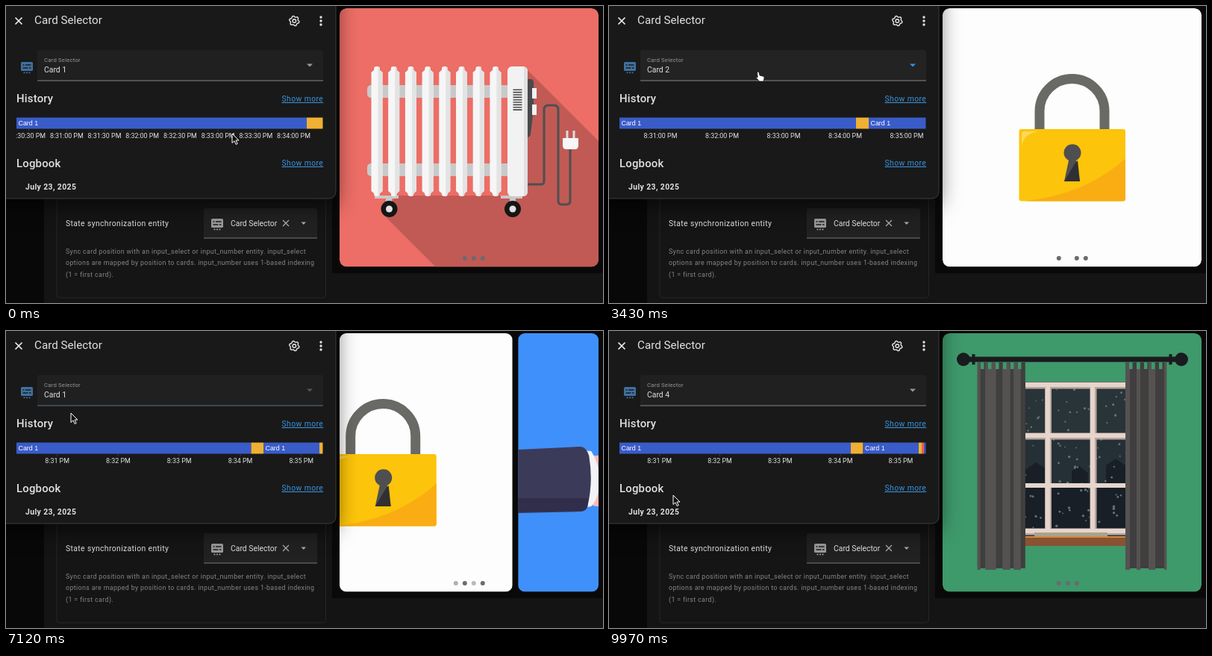
An HTML page for the animation above (10000 ms loop, 800 by 398 pixels).

```html
<!DOCTYPE html>
<html lang="en">
<head>
<meta charset="utf-8">
<style>
html, body { margin: 0; height: 100%; overflow: hidden; background: #080808; }
svg { display: block; width: 800px; height: 398px; font-family: Roboto, sans-serif; font-size: 10.4px; }
.heading { font-size: 14.9px; font-weight: 500; letter-spacing: .2px; }
.link { fill: #3a93dc; text-decoration: underline; letter-spacing: .4px; }
.small { font-size: 8.9px; }
.bar { font: 8.9px "Liberation Sans", Arial, sans-serif; fill: #fff; }
#dialog { filter: drop-shadow(0 10px 14px rgba(0,0,0,.6)); }
</style>
</head>
<body>
<svg viewBox="0 0 800 398" fill="#e1e1e1">
  <defs>
    <clipPath id="view"><rect x="447" y="3" width="347" height="346.500" rx="9"/></clipPath>
    <clipPath id="slide"><rect width="347" height="346.500" rx="9"/></clipPath>
    <clipPath id="axisClip"><rect x="14" y="145" width="411" height="40"/></clipPath>
    <clipPath id="menuClip"><rect x="42" y="106" width="83.500" height="129" rx="3"/></clipPath>
    <g id="selectIcon">
      <rect width="16" height="12" rx="1.500"/>
      <path d="M2.500 4h2m1.500 0h7.500M2.500 8h7m1.500 0h2.500" stroke="#1d1d1d" stroke-width="1.300"/>
      <path d="M3.500 14.300h2m1.500 0h2m1.500 0h2" stroke="currentColor" stroke-width="1.700"/>
    </g>
  </defs>

  <rect width="800" height="398" fill="#080808"/>
  <rect x="51" width="749" height="398" fill="#141414"/>
  <rect x="437" width="363" height="358" fill="#090909"/>
  <rect x="68" y="200" width="360.500" height="191" rx="4" fill="#151515" stroke="#262626"/>
  <text x="80" y="294.500" letter-spacing=".37">State synchronization entity</text>
  <path d="M265 311v-37q0-3 3-3h146q3 0 3 3v37z" fill="#212121"/>
  <path d="M265 311h152" stroke="#777"/>
  <use href="#selectIcon" x="275" y="285" fill="#9b9b9b" color="#9b9b9b"/>
  <text x="301" y="294.500">Card Selector</text>
  <path d="M371 287l8 8m0-8l-8 8" stroke="#aaa" stroke-width="1.300"/>
  <path d="M395.500 289.500h6.500l-3.250 3.500z" fill="#aaa"/>
  <g class="small" fill="#858585" letter-spacing=".35">
    <text x="80" y="331.500">Sync card position with an input_select or input_number entity. input_select</text>
    <text x="80" y="347">options are mapped by position to cards. input_number uses 1-based indexing</text>
    <text x="80" y="362.500">(1 = first card).</text>
  </g>

  <g clip-path="url(#view)">
    <g id="track">
      <g class="card">
        <rect x="447" y="3" width="347" height="347" fill="#ec6e66"/>
        <path d="M698 85l96 96v169H576l-72-72 20-24h150z" fill="#c15a55"/>
        <g fill="#c9c9c9"><rect x="484" y="106" width="200" height="17" rx="5"/><rect x="484" y="211" width="200" height="17" rx="5"/></g>
        <path d="M494 254h32v4h-9v9h-8v-9h-15zM663 254h29v4h-9v9h-8v-9h-12z" fill="#c9c9c9"/>
        <g fill="#161616"><circle cx="513.500" cy="272" r="11"/><circle cx="679" cy="272" r="11"/></g>
        <circle cx="513.500" cy="272" r="4.500"/><circle cx="679" cy="272" r="4.500"/>
        <g id="fins"></g>
        <path d="M698 98h5q4 0 4 5v35l-4 34q-1 4-5 4z" fill="#4a4a4c"/>
        <path d="M705 110h6v14h-6zM705 132h6v14h-6z" fill="#f2f2f2"/>
        <path d="M699 239h18q4 0 4-4V139q0-6 6-6h7q6 0 6 6v122q0 5 5 5h6q5 0 5-5v-70" fill="none" stroke="#4f4f51" stroke-width="3"/>
        <rect x="672" y="81" width="27" height="174" rx="6" fill="#f2f2f2"/>
        <path d="M694 81.500q5 1 5 6V249q0 5-5 6z" fill="#e0e0e0"/>
        <path d="M685.500 111.500v29" stroke="#4a4a4c" stroke-width="12" stroke-dasharray="1.600 1.750"/>
        <path d="M752 167v11m9-11v11" stroke="#ddd" stroke-width="3"/>
        <path d="M746 177h21v10q0 5-5 5h-11q-5 0-5-5z" fill="#f7f7f7"/>
      </g>
      <g class="card">
        <rect x="447" y="3" width="347" height="347" fill="#fdfdfd"/>
        <path d="M577 166v-25a43.500 43.500 0 0 1 87 0v25" fill="none" stroke="#696a65" stroke-width="13"/>
        <rect x="549.500" y="165" width="142.500" height="96.500" rx="3" fill="#fcc40a"/>
        <path d="M558 261.500q80-9 134-57v54q0 3-3 3z" fill="#f9ad13"/>
        <path d="M553 190q1-19 23-22h-19q-4 0-4 4z" fill="#fdd856"/>
        <path d="M616 207a11.500 11.500 0 1 1 10 0l5 28h-21z" fill="#4f4f51"/>
        <path d="M628 207l3 28h-21l15-25z" fill="#303033"/>
      </g>
      <g class="card">
        <rect x="447" y="3" width="347" height="347" fill="#4090fb"/>
        <path d="M606 190q-5 60 20 74 10 4 12-9l8-18q17-3 13-23l-9-35z" fill="#f99b98"/>
        <path d="M628 200q-10 22 2 46m18-56q-7 22 0 40" fill="none" stroke="#ef8582" stroke-width="1.500"/>
        <path d="M547 167q24 0 38-9 18-11 36-5 14 5 36 5l67-1q6 2 4 8-2 5-10 6l-63 14q-10 4-16 12-8 12-10 23 8 10 19 15 10 0 20 6 10 8 5 15-4 6-13 2-24-11-37-21-14-9-32-5-24 6-44 2z" fill="#fdbbb9"/>
        <path d="M657 247q10-6 17 2 2 7-5 10-10-2-12-12z" fill="#fed5d1"/>
        <path d="M534 160l11 1q11 17 11 40 0 22-11 34l-12 2z" fill="#f3f3f7"/>
        <path d="M447 159l82-4q9-1 13 12 6 35-2 68-2 7-9 7l-84 2z" fill="#3c3a59"/>
        <path d="M447 224l94.500 0-1.500 11q-2 6-9 6l-84 2z" fill="#302e4a"/>
        <rect x="772" y="141" width="10" height="39" rx="2" fill="#2e3153"/>
        <rect x="779" y="106" width="40" height="109" rx="6" fill="#fbfbfd"/>
      </g>
      <g class="card">
        <rect x="447" y="3" width="347" height="347" fill="#3e996b"/>
        <rect x="552" y="68" width="146" height="208" fill="#293439"/>
        <path d="M552 140h140v70H552z" fill="#253036"/>
        <path d="M558 264v-78l14-10 13 8v20h35v-16l10-7 12 9v16h24v-26l13-9 13 9v84z" fill="#181f27"/>
        <g id="snow" fill="#667178"></g>
        <path d="M558 73h134M588.500 70v196M649 70v196M558 141h134M558 269h134" stroke="#b9a69c" stroke-width="9"/>
        <path d="M558 72h134M588 70v196M648 70v196M558 140h134M558 207h134M558 268h134" stroke="#e5d5cc" stroke-width="6"/>
        <path d="M552 275h146v13H552z" fill="#8a5230"/>
        <path d="M570 270h98v6h-98z" fill="#aaa28c"/>
        <path d="M558 276h134" stroke="#c98e45" stroke-width="2"/>
        <g id="curtains"></g>
        <path d="M478 38h286" stroke="#1a1b1f" stroke-width="7"/>
        <path d="M488.500 31v14M752.500 31v14" stroke="#1a1b1f" stroke-width="4"/>
        <circle cx="475" cy="38" r="9" fill="#1a1b1f"/><circle cx="767" cy="38" r="9" fill="#1a1b1f"/>
      </g>
    </g>
    <g id="dots" fill="#6d6a6d"></g>
  </g>

  <path id="dialog" d="M-40-40H442V248q0 10-10 10H-40z" fill="#191919"/>
  <path d="M0 258h432q10 0 10-10V0" fill="none" stroke="#3d3d3d"/>
  <path d="M12.500 15.500l9 9m0-9l-9 9" stroke="#eee" stroke-width="1.700"/>
  <text x="38" y="24" font-size="15.200">Card Selector</text>
  <g fill="none" stroke="#e6e6e6" stroke-width="1.400" stroke-linejoin="round">
    <path id="gear"/><circle cx="386.300" cy="20" r="2.300"/>
  </g>
  <circle cx="422" cy="15" r="1.700"/><circle cx="422" cy="20" r="1.700"/><circle cx="422" cy="25" r="1.700"/>
  <use href="#selectIcon" x="20" y="75" fill="#41709f" color="#41709f"/>
  <path id="field" d="M42 100.500V62q0-3 3-3h377q3 0 3 3v38.500z"/>
  <path id="underline" d="M42 100h383"/>
  <text id="label" x="51" y="75.200" font-size="7.800" letter-spacing=".17">Card Selector</text>
  <text id="value" x="51" y="89"></text>
  <path id="caret"/>

  <text class="heading" x="14" y="129">History</text>
  <text class="link" x="369.500" y="128">Show more</text>
  <g id="history" clip-path="url(#axisClip)"></g>
  <text class="heading" x="14" y="215.500">Logbook</text>
  <text class="link" x="369.500" y="214">Show more</text>
  <text x="26" y="246" font-weight="600" letter-spacing=".4">July 23, 2025</text>

  <g id="menu">
    <rect x="42" y="106" width="83.500" height="129" rx="3" fill="#1c1c1c" style="filter:drop-shadow(0 3px 4px rgba(0,0,0,.5))"/>
    <g clip-path="url(#menuClip)">
      <rect id="chosen" x="42" width="83.500" height="35.700" fill="#203849"/>
      <g id="items"></g>
    </g>
  </g>
  <g id="cursor" stroke-linejoin="round">
    <path id="arrow" d="M0 0v12.500l3-2.700 2.200 4.700 2-1-2.200-4.500H9z" fill="#111" stroke="#fff"/>
    <path id="hand" d="M-1.500 1q1.500-1.800 2.500 0l1 4 5 1.300q1.300.5 1 2.200l-.8 4.500H1.500L-2.700 8.300q-.2-1.800 1.900-.8z" fill="#fff" stroke="#111" stroke-width=".8"/>
  </g>
</svg>
<script>
const $ = id => document.getElementById(id);
const set = (id, attrs) => { for (const k in attrs) $(id).setAttribute(k, attrs[k]); };
const range = (n, f) => Array.from({ length: n }, (_, i) => f(i)).join('');
const clamp = v => Math.max(0, Math.min(1, v));

const LOOP = 10000, PITCH = 354.5, SLIDE = 500, ITEM = 35.7;
// Each pick: menu opens, menu closes, slide starts, chosen card
const picks = [[1050, 1990, 2120, 1], [3450, 4250, 4380, 2], [5700, 6940, 7028, 0], [8300, 9330, 9420, 3]];
// Pointer path: time, x, y
const path = [[0, 303, 171], [300, 303, 171], [900, 200, 84], [1150, 200, 84], [1700, 98, 155], [2050, 88, 160],
  [3250, 200, 88], [3500, 200, 88], [4100, 86, 196], [4300, 86, 196], [4900, 237, 97], [5100, 237, 97],
  [5600, 200, 84], [5800, 200, 84], [6700, 80, 123], [6950, 80, 122], [7120, 87, 110], [7500, 87, 110],
  [8250, 171, 70], [8480, 171, 70], [9200, 85, 224], [9970, 86, 220], [LOOP, 86, 220]];
const history = [
  { at: 0, start: 30.5, first: 30.6, gap: 50.7, stride: .5, cuts: [403] },
  { at: 2400, start: 31, first: 69, gap: 82.5, stride: 1, cuts: [331, 348] },
  { at: 4600, start: 31, first: 68.7, gap: 82.1, stride: 1, cuts: [329.5, 346, 421] },
  { at: 7050, start: 31, first: 68.6, gap: 81.8, stride: 1, cuts: [328.5, 345, 420] },
  { at: 7500, start: 31, first: 68.3, gap: 81.1, stride: 1, cuts: [326, 342.5, 417, 421] },
  { at: 9600, start: 31, first: 67.7, gap: 80.8, stride: 1, cuts: [324, 340.5, 415, 419, 422.5] }];
const colors = ['#3a5cc9', '#f0b033', '#3a5cc9', '#f0b033', '#e2644f', '#3a5cc9'];

document.querySelectorAll('.card').forEach((card, i) => {
  card.setAttribute('transform', `translate(${i * PITCH})`);
  const inner = card.innerHTML;
  card.innerHTML = `<g clip-path="url(#slide)" transform="translate(447 3)"><g transform="translate(-447 -3)">${inner}</g></g>`;
});
$('fins').innerHTML = range(8, i => `<g transform="translate(${489.5 + i * 22.7} 81)">
  <path d="M4 1q3.500-2 7 0l.5 4 3.500 3v159l-3.500 3-.5 3q-3.500 2-7 0l-.5-3-3.500-3V8l3.500-3z" fill="#f6f6f6"/>
  <path d="M9 0l2 1 .5 4 3.500 3v159l-3.500 3-.5 3-2 1z" fill="#e3e3e3"/></g>`);

let seed = 7;
const random = () => (seed = seed * 16807 % 2147483647) / 2147483647;
$('snow').innerHTML = range(100, () =>
  `<circle cx="${558 + random() * 134}" cy="${78 + random() * 186}" r="${.8 + random() * .9}"/>`);

const curtain = (x, widths, end) => widths.map((w, i) => {
  const strip = `<path d="M${x} 42h${w + .3}v${i % 2 ? end - 2 : end}h-${w + .3}z" fill="${i % 2 ? '#403e3f' : '#555251'}"/>`;
  x += w;
  return strip;
}).join('');
const loops = (x, n) => `<path d="M${x} 46.500h${n * 10}" stroke="#3e996b" stroke-width="9" stroke-dasharray="4.500 5.500"/>`;
$('curtains').innerHTML = curtain(493.5, [4, 7, 14, 9, 10, 5, 9, 6], 278) + curtain(692, [6, 9, 5, 11, 9, 12, 3], 278) +
  loops(498, 6) + loops(697, 5);

$('gear').setAttribute('d', 'M' + Array.from({ length: 24 }, (_, i) => {
  const a = (i + .5) * Math.PI / 12, r = i % 4 < 2 ? 6.7 : 5.3;
  return (386.3 + r * Math.cos(a)).toFixed(2) + ' ' + (20 + r * Math.sin(a)).toFixed(2);
}).join('L') + 'z');
$('dots').innerHTML = range(4, i => `<circle cx="${602.8 + i * 12}" cy="338" r="3"/>`);
$('items').innerHTML = range(4, i => `<text x="57" y="${128 + i * ITEM}">Card ${i + 1}</text>`);

function drawHistory({ start, first, gap, stride, cuts }, long) {
  const edges = [14, ...cuts, 424.5];
  const bars = range(edges.length - 1, i => {
    const x = edges[i], w = edges[i + 1] - x;
    return `<rect x="${x}" y="149.500" width="${w}" height="15" fill="${colors[i]}"/>` +
      (w > 50 ? `<text class="bar" x="${x + 2.5}" y="160">Card 1</text>` : '');
  });
  const labels = range(stride < 1 ? 8 : 5, i => {
    const minute = start + i * stride, x = first + i * gap;
    const seconds = long ? (minute % 1 ? ':30' : ':00') : '';
    return `<path d="M${x} 165v3" stroke="#3a3a3a"/>
      <text class="small" x="${x}" y="177.300" text-anchor="middle">8:${Math.floor(minute)}${seconds} PM</text>`;
  });
  $('history').innerHTML = bars + labels;
}

function pointer(t) {
  const i = path.findIndex(p => p[0] > t), [t0, x0, y0] = path[i - 1], [t1, x1, y1] = path[i];
  const u = (t - t0) / (t1 - t0), k = u * u * (3 - 2 * u);
  return [x0 + (x1 - x0) * k, y0 + (y1 - y0) * k];
}

let shown = -1;
function draw(t) {
  let value = 0, scroll = 0, active = 0, previous = 0, fade = 1, menu = 0, openFor = 0, pressed = false, closing = false;
  for (const [open, close, slide, card] of picks) {
    if (t >= open - 60 && t < close) pressed = true;
    if (t >= open && t < close + 75) {
      openFor = t - open;
      menu = clamp(openFor / 120) * clamp((close + 75 - t) / 75);
    }
    if (t >= close) {
      value = card;
      closing = t < close + 250;
    }
    if (t >= slide) {
      const u = clamp((t - slide) / SLIDE);
      scroll += (card - scroll) * (1 - (1 - u) ** 2);
      previous = active;
      active = card;
      fade = clamp((t - slide) / 200);
    }
  }
  set('track', { transform: `translate(${-scroll * PITCH})` });
  [...$('dots').children].forEach((dot, i) =>
    dot.setAttribute('opacity', i === active ? 1 - fade : i === previous ? fade : 1));

  const focus = menu > 0 && pressed, blue = '#2f95e8';
  $('value').textContent = 'Card ' + (value + 1);
  set('field', { fill: pressed ? '#232323' : '#202020' });
  set('underline', { stroke: focus ? blue : closing ? '#55708a' : '#858585', 'stroke-width': focus ? 1.6 : 1 });
  set('label', { fill: focus ? blue : '#969696' });
  set('caret', {
    d: focus ? 'M403 82h8l-4-4z' : 'M403 77.500h8l-4 4z',
    fill: pressed ? blue : closing ? '#555' : '#999'
  });

  const current = picks.reduce((card, p) => t >= p[1] + 75 ? p[3] : card, 0);
  set('menu', { opacity: menu, transform: `translate(0 ${106 * .1 * (1 - menu)}) scale(1 ${.9 + .1 * menu})` });
  set('chosen', { y: 106 + current * ITEM, opacity: clamp(.35 + openFor / 700) });
  [...$('items').children].forEach((item, i) => item.setAttribute('fill', i === current ? blue : '#e1e1e1'));

  const latest = history.filter(h => h.at <= t).length - 1;
  if (latest !== shown) drawHistory(history[shown = latest], latest < 2);

  const [x, y] = pointer(t), hand = menu > 0 && pressed || x > 42 && x < 425 && y > 59 && y < 101;
  set('cursor', { transform: `translate(${x} ${y})` });
  set('arrow', { display: hand ? 'none' : 'inline' });
  set('hand', { display: hand ? 'inline' : 'none' });
}

const begin = performance.now();
(function tick() {
  draw((performance.now() - begin) % LOOP);
  requestAnimationFrame(tick);
})();
</script>
</body>
</html>
```
